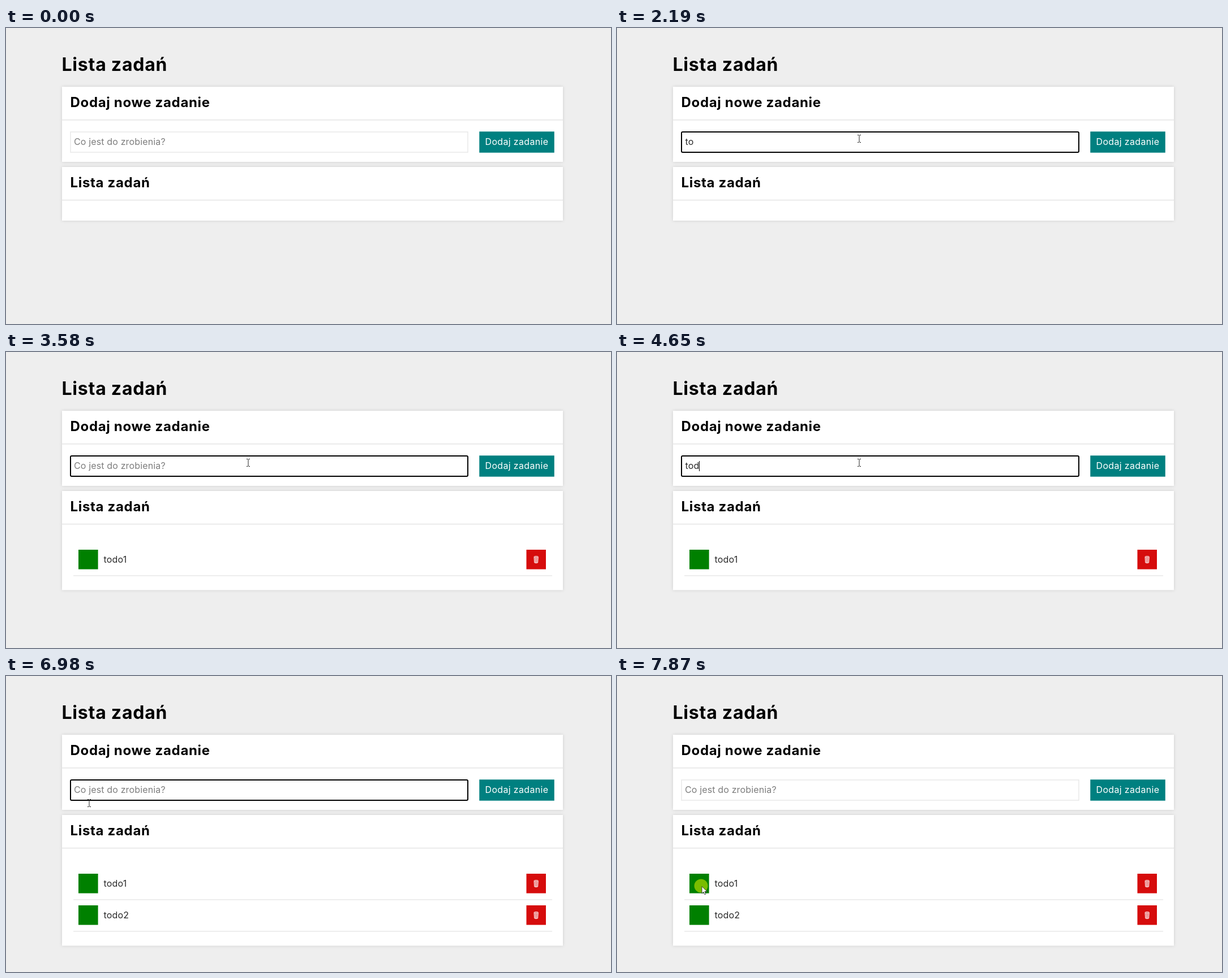
Recreate the animation shown at these times as an HTML page. Size 1069x524 px, loop 8 s.

```html
<!DOCTYPE html>
<html lang="pl">
<head>
<meta charset="utf-8">
<title>Lista zadań</title>
<style>
  html, body { margin: 0; width: 100%; height: 100%; overflow: hidden; background: #eee; }
  svg { display: block; width: 1069px; height: 524px; }
  text { font: 400 16px Inter, "Noto Sans", sans-serif; white-space: pre; }
  .title { font-size: 32px; font-weight: 700; letter-spacing: .024em; }
  .head { font-size: 24px; font-weight: 700; letter-spacing: .028em; }
  .button { fill: #fff; letter-spacing: .021em; }
  .hint { fill: #7d7d7d; letter-spacing: .009em; }
  .value, .label { fill: #2a2a2a; letter-spacing: .01em; }
  .panel { fill: #fff; filter: drop-shadow(0 0 2.5px #ccc); }
  .line { fill: #eee; }
  #box { fill: #fff; stroke: #e9e9e9; stroke-width: 1.5px; }
  #box.focused { stroke: #000; stroke-width: 2px; rx: 2px; }
</style>
</head>
<body>
<svg viewBox="0 0 1069 524">
  <defs>
    <g id="row">
      <rect x="128" y="350" width="34.6" height="34.6" fill="green"/>
      <rect x="919.5" y="350" width="34.5" height="34.6" fill="#d60c0c"/>
      <g fill="#fff" fill-opacity=".35" stroke="#fff" stroke-opacity=".85">
        <ellipse cx="936.7" cy="362.8" rx="3.8" ry="1.3"/>
        <path d="M933 363.5l.8 9.5q2.9 1.4 5.8 0l.8-9.5M935.4 365l.3 8M938 365l-.3 8"/>
      </g>
      <rect class="line" x="119" y="395" width="846" height="2"/>
    </g>
  </defs>

  <text class="title" x="98.5" y="76">Lista zadań</text>

  <rect class="panel" x="99" y="104" width="885" height="133"/>
  <rect class="line" x="99" y="161.5" width="885" height="2.5"/>
  <text class="head" x="113.5" y="140">Dodaj nowe zadanie</text>
  <rect id="box" x="114" y="184" width="702" height="36"/>
  <text class="hint" id="hint" x="120" y="207">Co jest do zrobienia?</text>
  <text class="value" id="value" x="120.5" y="207"></text>
  <rect id="caret" y="193" width="1" height="18"/>
  <rect x="836.3" y="183.3" width="132.5" height="37.4" fill="teal"/>
  <text class="button" x="846.5" y="207">Dodaj zadanie</text>

  <rect class="panel" id="list" x="99" y="246" width="885"/>
  <rect class="line" x="99" y="303.5" width="885" height="2.5"/>
  <text class="head" x="113.5" y="282">Lista zadań</text>
  <g id="rows"></g>

  <g id="pointer">
    <circle id="glow" cx="-1.5" cy="-1" r="12" fill="#ff0" fill-opacity=".48"/>
    <path id="beam" d="M-3 -6.5h2l1 1 1-1h2M0 -5.5v11M-3 6.5h2l1-1 1 1h2" fill="none" stroke="#222"/>
    <path id="arrow" d="M0 0v12.5l2.9-2.7 2 4.6 2.1-.9-2-4.5h4z" fill="#fff" stroke="#222" stroke-width=".8"/>
  </g>
</svg>
<script>
const LOOP = 8000, BLINK = 530, STEP = 70, ROW = 56;
const FOCUS = 860, RELEASE = 940, BLUR = 7870;

const tasks = [
  { word: "todo1", keys: [1520, 1660, 2260, 2390, 2670], enter: 3580 },
  { word: "todo2", keys: [4320, 4390, 4650, 4700, 5060], enter: 5980 }
];

// Each stroke is a quadratic curve: start, control, end
const linear = u => u;
const easeOut = u => 1 - (1 - u) ** 1.5;
const strokes = [
  { from: 70, to: FOCUS, x: [452, 434, 430], y: [456, 15, 196], ease: easeOut },
  { from: FOCUS, to: RELEASE, x: [430, 429, 428], y: [196, 196, 196], ease: linear },
  { from: 6650, to: 6980, x: [428, 300, 147], y: [196, 22, 225], ease: linear },
  { from: 6980, to: 7740, x: [147, -86, 150], y: [225, 370, 372.5], ease: easeOut }
];

const el = id => document.getElementById(id);
const show = (node, on) => node.setAttribute("visibility", on ? "visible" : "hidden");
const curve = ([a, b, c], u) => (1 - u) ** 2 * a + 2 * u * (1 - u) * b + u * u * c;

el("rows").innerHTML = tasks.map(({ word }, i) =>
  `<g transform="translate(0 ${i * ROW})"><use href="#row"/><text class="label" x="172.5" y="373">${word}</text></g>`
).join("");

function drawField(t) {
  const focused = t >= FOCUS && t < BLUR;
  const task = tasks.find(({ enter }) => t < enter);
  const typed = task ? task.keys.filter(key => key <= t).length : 0;
  el("box").classList.toggle("focused", focused);
  el("value").textContent = task ? task.word.slice(0, typed) : "";
  show(el("hint"), !typed);

  // Every key press restarts the caret blink
  const start = [FOCUS, ...tasks.flatMap(({ keys }) => keys)].findLast(key => key <= t);
  show(el("caret"), focused && Math.floor((t - start) / BLINK) % 2 === 0);
  const width = typed ? el("value").getComputedTextLength() : 0;
  el("caret").setAttribute("x", Math.round(120 + width));
}

function drawList(t) {
  const count = tasks.filter(({ enter }) => enter <= t).length;
  el("list").setAttribute("height", count ? 119.5 + count * ROW : 95);
  [...el("rows").children].forEach((row, i) => show(row, i < count));
}

function drawPointer(t) {
  const stroke = strokes.findLast(({ from }) => from <= t);
  show(el("pointer"), stroke);
  show(el("glow"), t >= FOCUS && t < RELEASE || t >= BLUR);
  if (!stroke) {
    show(el("beam"), false);
    show(el("arrow"), false);
    return;
  }

  const { from, to, x, y, ease } = stroke;
  const steps = Math.round((to - from) / STEP);
  const progress = Math.min(1, (t - from) / (to - from));
  const u = ease(Math.floor(progress * steps) / steps);
  const px = curve(x, u), py = curve(y, u);
  const overText = px > 113 && py < 230;
  el("pointer").setAttribute("transform", `translate(${px} ${py})`);
  show(el("beam"), overText);
  show(el("arrow"), !overText);
}

function frame() {
  const t = performance.now() % LOOP;
  drawField(t);
  drawList(t);
  drawPointer(t);
  requestAnimationFrame(frame);
}
frame();
</script>
</body>
</html>
```
